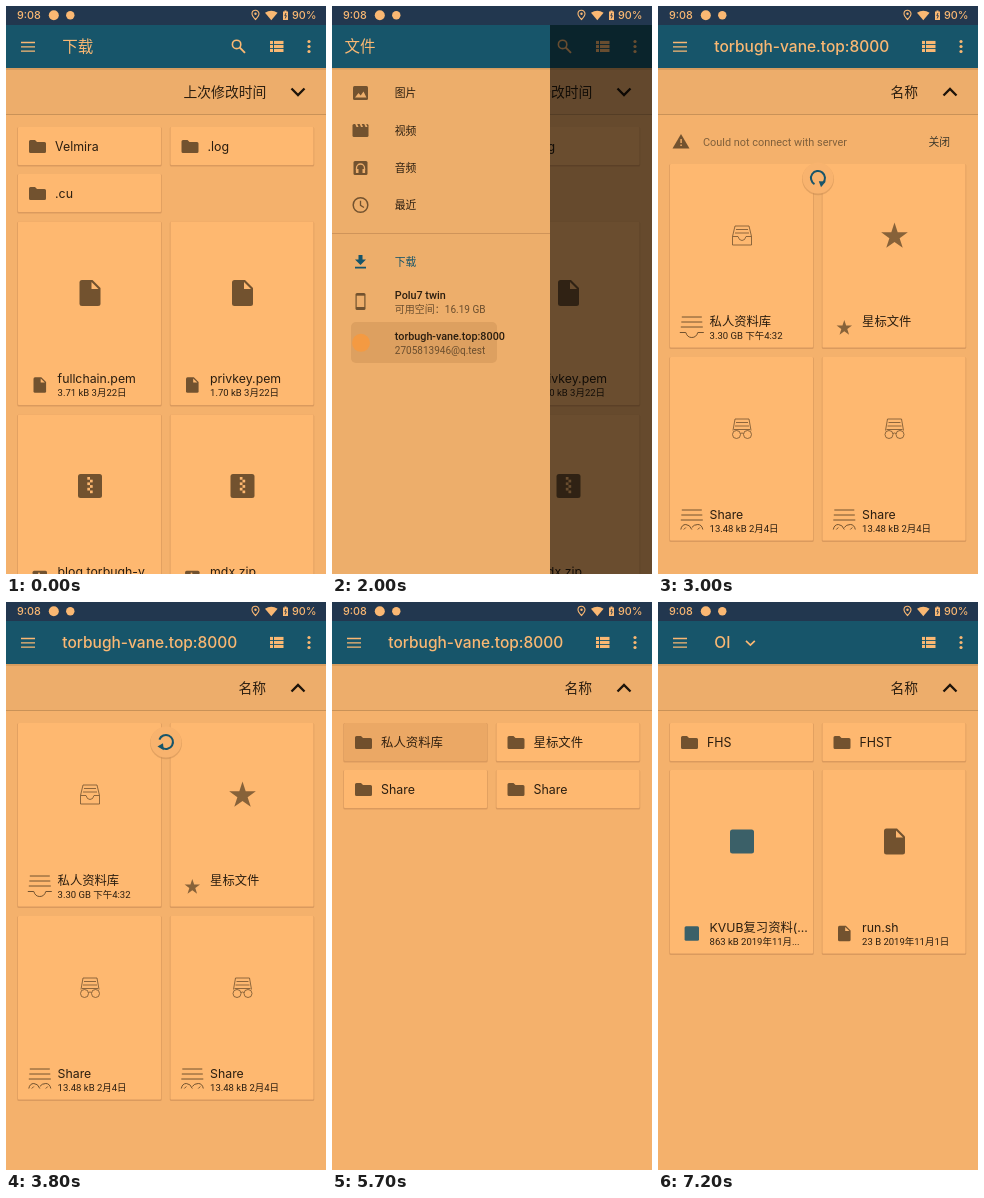
These frames come from a looping animation (320 px wide and 568 px high, 8000 ms). An HTML page:

```html
<!DOCTYPE html>
<html lang="zh-CN">
<head>
<meta charset="utf-8">
<title>Files</title>
<style>
html, body { margin: 0; width: 100%; height: 100%; overflow: hidden; background: #f4b16c; }
svg { display: block; width: 320px; height: 568px; }
text { white-space: pre; font-family: Inter, "Noto Sans CJK SC", "Noto Sans CJK", sans-serif; }
text.r { font-family: Roboto, "Noto Sans CJK SC", "Noto Sans CJK", sans-serif; }
</style>
</head>
<body>
<svg id="stage" viewBox="0 0 320 568"></svg>
<script>
const BAR = '#17556a', PEACH = '#fab873', PAGE = '#f4b16c', CARD = '#feb870', BROWN = '#72522f', INK = '#2b1e10';
const HOST = 'torbugh-vane.top:8000';
const LOOP = 8000, STEP = 100;
const stage = document.getElementById('stage');

const clamp = v => Math.max(0, Math.min(1, v));
const easeOut = k => 1 - (1 - clamp(k)) ** 3;
const rect = (x, y, w, h, fill, extra = '') => `<rect x="${x}" y="${y}" width="${w}" height="${h}" fill="${fill}" ${extra}/>`;
const circle = (x, y, r, fill, extra = '') => `<circle cx="${x}" cy="${y}" r="${r}" fill="${fill}" ${extra}/>`;
const path = (d, fill, extra = '') => `<path d="${d}" fill="${fill}" ${extra}/>`;
const line = (d, color, width) => path(d, 'none', `stroke="${color}" stroke-width="${width}"`);
const at = (x, y, body, scale = 1) => `<g transform="translate(${x} ${y}) scale(${scale})">${body}</g>`;
const fade = (o, body) => o > 0 ? `<g opacity="${o}">${body}</g>` : '';
const text = (x, y, s, size, fill = INK, weight = 400, cls = '') =>
  `<text x="${x}" y="${y}" font-size="${size}" fill="${fill}" font-weight="${weight}" class="${cls}">${s}</text>`;
const small = (x, y, s, size, fill, weight) => text(x, y, s, size, fill, weight, 'r');

// Icons, each centred on 0,0
const lines = 'M-10 -10.5H10M-10.5 -5.5H10.5M-11 -.5H11';
const thin = (d, w = 0.8) => line(d, BROWN, w);
const starPoints = Array.from({ length: 10 }, (_, i) => {
  const r = i % 2 ? 5.4 : 14, a = (i / 5 - 0.5) * Math.PI;
  return `${r * Math.cos(a)},${r * Math.sin(a) + 1}`;
}).join(' ');
const folder = path('M-7 -6.5H-2.5L-.5 -4.5H7Q8.5 -4.5 8.5 -3V5Q8.5 6.5 7 6.5H-7Q-8.5 6.5 -8.5 5V-5Q-8.5 -6.5 -7 -6.5Z', BROWN);
const page = path('M-8 -13H2.5L10.5 -5V10.5Q10.5 13 8 13H-8Q-10.5 13 -10.5 10.5V-10.5Q-10.5 -13 -8 -13Z', BROWN)
  + path('M1.5 -11V-4H8.5Z', CARD);
const zip = rect(-12, -12, 24, 24, BROWN, 'rx="2.5"')
  + [0, 1, 2, 3, 4, 5].map(i => rect(i % 2 ? 0 : -2.7, -9 + i * 2.7, 2.7, 2.7, CARD)).join('');
const star = `<polygon points="${starPoints}" fill="${BROWN}" opacity=".85"/>`;
const doc = rect(-12, -12, 24, 24, '#3b6068', 'rx="2.5"');
const tray = thin('M-7 -9.5H7L9.5 1V9.5H-9.5V1ZM-6 -6H6M-7 -2.5H7M-9.5 1H-4Q-3 5 0 5T4 1H9.5');
const traySmall = thin(lines + 'M-12 5H-6Q-4.5 10 0 10T6 5H12', 1);
const shared = thin('M-9 2L-7 -9.5H7L9 2M-6 -6H6M-7 -2.5H7M-8 1H8M-9.5 6a4 4 0 1 0 8 0a4 4 0 1 0 -8 0M1.5 6a4 4 0 1 0 8 0a4 4 0 1 0 -8 0M-1.5 5Q0 4 1.5 5');
const sharedSmall = thin(lines + 'M-11 9Q-10 4 -6 4T0 9M0 7Q2 4 6 4T11 9M-8 9L-6 7M6 9L8 7', 1);
const ICONS = {
  page: [page, at(0, 0, page, 0.6)], zip: [zip, at(0, 0, zip, 0.6)], doc: [doc, at(0, 0, doc, 0.6)],
  star: [star, at(0, 0, star, 0.58)], tray: [tray, traySmall], shared: [shared, sharedSmall]
};

const card = (x, y, h) => rect(x - 0.7, y, 144.4, h + 1.6, '#d2935a', 'rx="1.5" opacity=".75"') + rect(x, y, 143, h, CARD, 'rx="1"');
const column = i => 12 + (i % 2) * 152.5;

const folders = (names, y) => names.map((name, i) => {
  const x = column(i), top = y + (i >> 1) * 47;
  return card(x, top, 38) + at(x + 19.5, top + 19.5, folder) + text(x + 37, top + 23.8, name, 12.4);
}).join('');

const files = (list, y) => list.map(([icon, name, info], i) => {
  const x = column(i), top = y + (i >> 1) * 193, [big, mini] = ICONS[icon];
  return card(x, top, 183.5) + at(x + 72, top + 71.5, big) + at(x + 21.8, top + 163.5, mini)
    + text(x + 39.6, top + 161.7, name, 12.3) + small(x + 39.6, top + 174.8, info, 9.5);
}).join('');

const SERVER = ['私人资料库', '星标文件', 'Share', 'Share'];
const serverFiles = y => files([
  ['tray', SERVER[0], '3.30 GB 下午4:32'], ['star', SERVER[1], ''],
  ['shared', 'Share', '13.48 kB 2月4日'], ['shared', 'Share', '13.48 kB 2月4日']], y);
const downloads = () => folders(['Velmira', '.log', '.cu'], 121) + files([
  ['page', 'fullchain.pem', '3.71 kB 3月22日'], ['page', 'privkey.pem', '1.70 kB 3月22日'],
  ['zip', 'blog.torbugh-v', ''], ['zip', 'mdx.zip', '']], 215.5);
const library = y => folders(['blog', 'file transfer', 'OI', 'qlfs'], y);
const subfolder = () => folders(['FHS', 'FHST'], 121) + files([
  ['doc', 'KVUB复习资料(...', '863 kB 2019年11月...'], ['page', 'run.sh', '23 B 2019年11月1日']], 168);

const banner = o => fade(o, path('M23 128L31.5 142.5H14.5Z', BROWN) + path('M22.4 133h1.4v4h-1.4zM22.4 138.5h1.4v1.5h-1.4z', PAGE)
  + small(45, 139.5, 'Could not connect with server', 10.9, '#80603b') + small(270.5, 139.5, '关闭', 10.8, '#3f3a2c', 500));

const spinner = (y, turn, scale) => at(160, y, circle(0, 1.3, 16, '#c88c53', 'opacity=".5"') + circle(0, 0, 15.5, '#f8b36e')
  + `<g transform="rotate(${turn})">` + line('M-3.5 6.1A7 7 0 1 1 5 4.9', BAR, 2) + path('M.8 3.2L7.8 3.6L3 9.2Z', BAR) + '</g>', scale);

const ripple = (x, y, k) => rect(x, y, 143, 38, '#6d431a', `opacity="${0.08 + 0.1 * k}"`);
const slide = (k, body) => at(0, 459 * (1 - k), rect(0, 109, 320, 459, PAGE) + body);

function statusBar() {
  return rect(0, 0, 320, 19, '#22374f') + text(11, 13, '9:08', 10.8, PEACH, 500)
    + circle(47.8, 9.3, 5, PEACH) + circle(64.3, 9.3, 4.2, PEACH)
    + line('M249.5 13.5Q246 9.8 246 7.8A3.5 3.5 0 0 1 253 7.8Q253 9.8 249.5 13.5Z', PEACH, 1.1) + circle(249.5, 7.8, 1.2, PEACH)
    + path('M259 6.8Q265.3 2.5 271.6 6.8L265.3 14.2Z', PEACH)
    + path('M277 5.5H278.5V4.5H280.5V5.5H282V14H277Z', PEACH) + line('M280 7L278.8 9.7H280.4L279.2 12.5', '#22374f', 0.9)
    + text(286, 13, '90%', 10.8, PEACH, 500);
}

function appBar(title, chevron, search) {
  const rows = [36.5, 40.5, 44.5].map(y => rect(264, y - 1.6, 3, 3.1, PEACH) + rect(268, y - 1.6, 9.5, 3.1, PEACH)).join('');
  return rect(0, 19, 320, 43, BAR) + line('M15 36.5H29M15 40.8H29M15 45.1H29', PEACH, 1.3)
    + text(56.3, 46.2, title, 15.5, PEACH, /[a-z]/i.test(title) ? 500 : 400)
    + (chevron ? line(`M${chevron} 38.8l4.4 4.2l4.4 -4.2`, PEACH, 1.7) : '')
    + (search ? circle(230.6, 38.4, 4.2, 'none', `stroke="${PEACH}" stroke-width="1.6"`) + line('M233.6 41.4L239 46.8', PEACH, 1.9) : '')
    + rows + [35.5, 40.5, 45.5].map(y => circle(303, y, 1.6, PEACH)).join('');
}

function sortBar(recent) {
  return rect(0, 62, 320, 46, '#edad6b') + rect(0, 62, 320, 2, '#9b6d3d', 'opacity=".25"') + rect(0, 108, 320, 1, '#c99258')
    + text(recent ? 177.5 : 232.5, 91, recent ? '上次修改时间' : '名称', 13.8, INK)
    + line(recent ? 'M285.5 82.5l6.5 6.5l6.5 -6.5' : 'M285.5 89.5l6.5 -6.5l6.5 6.5', '#1e140a', 2.3);
}

function drawer(open, press) {
  if (open <= 0) return '';
  const label = (y, s, fill = INK) => small(62.8, y, s, 10.8, fill, 500);
  const icons = at(28.5, 87, rect(-7.5, -7, 15, 14, BROWN, 'rx="1.5"') + path('M-5.5 4.5L-2 0L.2 2.5L3 -1.5L6 4.5Z', '#edae6b'))
    + at(28.5, 124.5, rect(-8, -6.5, 16, 13, BROWN, 'rx="1.5"') + path('M-5.5 -7h2l1.5 3.5h-2zM-1 -7h2l1.5 3.5h-2zM3.5 -7h2l1.5 3.5h-2z', '#edae6b'))
    + at(28.5, 162, rect(-7, -7, 14, 14, BROWN, 'rx="1.5"') + line('M-4 2V0A4 4 0 0 1 4 0V2', '#edae6b', 1.3) + path('M-4.6 1h2.6v4h-2.6zM2 1h2.6v4h-2.6z', '#edae6b'))
    + at(28.5, 199, circle(0, 0, 7.3, 'none', `stroke="${BROWN}" stroke-width="1.5"`) + line('M0 -4.2V.4L3.5 2.5', BROWN, 1.3))
    + at(28.5, 256, path('M-2 -7H2V-2.5H5.5L0 3L-5.5 -2.5H-2ZM-5.5 4.7H5.5V6.5H-5.5Z', BAR))
    + at(28.5, 295.5, rect(-5, -8.5, 10, 17, BROWN, 'rx="1.5"') + rect(-3.8, -5.8, 7.6, 11.3, '#edae6b'))
    + circle(29, 336.8, 9, '#f49a42');
  const pill = press > 0 ? rect(19, 316, 146 + 46 * (press - 1), 41, '#76491c', 'rx="5" opacity=".14"') : '';
  return rect(0, 19, 320, 549, '#000', `opacity="${0.58 * open}"`) + at(-218 * (1 - open), 0,
    rect(0, 19, 218, 549, '#edae6b') + rect(0, 62, 218, 1.5, '#9b6d3d', 'opacity=".25"') + rect(0, 19, 218, 43, BAR)
    + text(12.5, 46.2, '文件', 15.5, PEACH) + rect(0, 227, 218, 1, '#cf945a') + pill + icons
    + label(91, '图片') + label(128.5, '视频') + label(166, '音频') + label(203, '最近') + label(260.3, '下载', BAR)
    + label(293, 'Polu7 twin') + small(62.8, 307, '可用空间：16.19 GB', 10, '#6b4e2e')
    + label(334.3, HOST) + small(62.8, 348.3, '2705813946@q.test', 10, '#6b4e2e'));
}

function progress(t) {
  const k = (t - 6100) / 500, left = 173 * k * k, right = Math.min(320, 60 + 560 * k);
  return rect(0, 108, 320, 4, '#c09963') + rect(left, 108, right - left, 4, BAR);
}

function serverBody(t) {
  if (t >= 4500) return folders(SERVER, 121);
  const lift = easeOut((t - 3300) / 400), swap = clamp((t - 4200) / 300);
  let out = banner(1 - clamp((t - 3300) / 200)) + fade(1 - swap, serverFiles(158 - 37 * lift)) + fade(swap, folders(SERVER, 121));
  return out;
}

function libraryScene(t) {
  const loading = t >= 6100 && t < 6700;
  const inside = t >= 5800, deep = t >= 6800;
  const list = library(loading ? 124 : 121);
  let body = '';
  if (t < 6200) body += folders(SERVER, 121) + (t >= 5600 ? ripple(12, 121, (t - 5600) / 200) : '');
  if (inside && t < 7200) body += slide(easeOut((t - 5700) / 400), list) + (t >= 6700 ? ripple(12, 168, 1) : '');
  if (deep) body += slide(easeOut((t - 6700) / 500), subfolder());
  const bar = deep ? appBar('OI', 88) : inside ? appBar(SERVER[0], 149) : appBar(HOST);
  return body + sortBar(false) + (loading ? progress(t) : '') + bar;
}

function draw(t) {
  const early = t < 2200;
  let out = rect(0, 0, 320, 568, PAGE);
  if (t >= 5600) out += libraryScene(t);
  else {
    out += early ? downloads() : serverBody(t);
    if (t >= 3000 && t < 4600) out += spinner(172 - 32 * easeOut((t - 3000) / 300), (t - 3000) * 0.55, 1 - clamp((t - 4300) / 300));
    out += sortBar(early) + appBar(early ? '下载' : HOST, 0, early);
  }
  if (t >= 700 && t < 2500) {
    const open = t < 2000 ? easeOut((t - 600) / 600) : 1 - easeOut((t - 2100) / 400);
    out += drawer(open, t < 2000 ? 0 : t < 2100 ? 1 : 2);
  }
  stage.innerHTML = out + statusBar();
}

const start = performance.now();
let shown = -1;
function tick() {
  const t = Math.floor((performance.now() - start) % LOOP / STEP) * STEP;
  if (t !== shown) draw(shown = t);
  requestAnimationFrame(tick);
}
tick();
</script>
</body>
</html>
```
